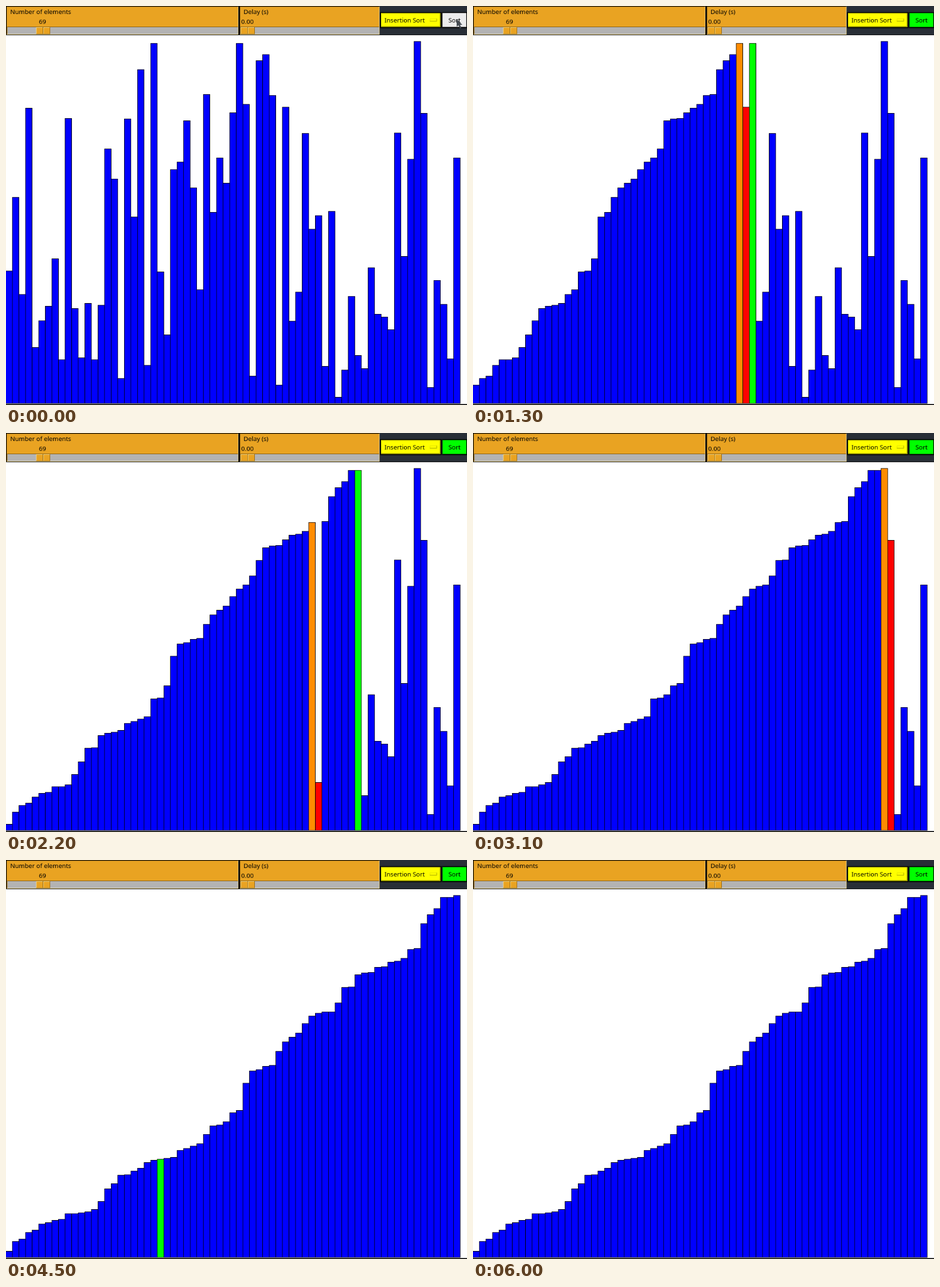
Animation of 804 by 697 pixels, one loop 6500 ms. Source, as an HTML page with a canvas:

```html
<!DOCTYPE html>
<html lang="en">
<head>
<meta charset="utf-8">
<title>Insertion sort</title>
<style>
html, body { margin: 0; width: 100%; height: 100%; overflow: hidden; background: #fff; }
canvas { display: block; }
</style>
</head>
<body>
<canvas id="stage" width="804" height="697"></canvas>
<script>
// The window is drawn at its natural size and then shrunk smoothly to the stage.
const W = 980, H = 850, SHRINK = 0.82;
const stage = document.getElementById('stage').getContext('2d');
const view = document.createElement('canvas');
view.width = W;
view.height = H;
const ctx = view.getContext('2d');

const LOOP = 6500, TICK = 100, BAR = 14, FLOOR = 846;
const BLUE = '#0000ff', GREEN = '#00ff00', RED = '#ff0000', ORANGE = '#ff8c00';
const PANEL = '#e9a322', SHADE = '#8c6214', GLOW = '#ffe490';

// The unsorted input, as the top edge of each bar on the stage.
const input = [
  462, 334, 503, 178, 596, 549, 524, 441, 617, 196, 528, 614, 519, 617, 522, 249, 302, 650,
  197, 368, 111, 627, 65, 464, 574, 285, 272, 200, 317, 495, 154, 360, 265, 309, 186, 65,
  171, 646, 95, 84, 156, 662, 176, 550, 499, 222, 389, 366, 629, 358, 683, 635, 507, 610,
  633, 457, 538, 543, 565, 221, 437, 267, 61, 187, 666, 479, 521, 616, 265
].map(y => Math.floor((y + 0.5) / SHRINK));

// Every swap of the sort, recorded just before it happens.
const steps = [];
const sorted = input.slice();
for (let i = 1; i < sorted.length; i++) {
  for (let j = i; j > 0 && sorted[j] > sorted[j - 1]; j--) {
    steps.push({ i, j, bars: sorted.slice() });
    [sorted[j - 1], sorted[j]] = [sorted[j], sorted[j - 1]];
  }
}

// Key points of the progress: swaps first, then the checking sweep.
const end = steps.length;
const stepAt = (i, j) => steps.findIndex(s => s.i === i && s.j === j);
const pace = [
  [300, 1], [700, stepAt(21, 17)], [1300, stepAt(42, 41)], [2200, stepAt(53, 47)],
  [3100, stepAt(63, 63)], [3700, end], [4300, end + 20], [4500, end + 23],
  [5000, end + 40], [6000, end + input.length]
];
const pauses = [400, 2600, 2700, 3400, 3900, 4400, 5100, 5600];

function progress(time) {
  const k = pace.findIndex(p => p[0] > time);
  if (k < 1) return k < 0 ? end + input.length : -1;
  const [t0, n0] = pace[k - 1], [t1, n1] = pace[k];
  return Math.round(n0 + (n1 - n0) * (time - t0) / (t1 - t0));
}

function rect(x, y, w, h, color) {
  ctx.fillStyle = color;
  ctx.fillRect(x, y, w, h);
}

function bevel(x, y, w, h, fill, topLeft, bottomRight, size = 1) {
  rect(x, y, w, h, bottomRight);
  rect(x, y, w - size, h - size, topLeft);
  rect(x + size, y + size, w - 2 * size, h - 2 * size, fill);
}

function label(text, x, y) {
  ctx.fillStyle = '#000';
  ctx.fillText(text, x, y);
}

function scale(x, w, title, value, valueX, knobX) {
  bevel(x, 1, w, 60, PANEL, SHADE, GLOW);
  bevel(x + 1, 44, w - 1, 17, '#b3b3b3', SHADE, GLOW);
  for (const half of [0, 15]) bevel(knobX + half, 45, 15, 15, PANEL, GLOW, SHADE);
  label(title, x + 8, 17);
  label(value, valueX, 38);
}

function cursor() {
  ctx.beginPath();
  [[958, 28], [958, 44], [962, 41], [965, 48], [968, 46], [965, 40], [970, 40]]
    .forEach(([x, y]) => ctx.lineTo(x, y));
  ctx.fillStyle = '#454b52';
  ctx.fill();
}

function header(time) {
  rect(0, 0, W, 62, '#000');
  rect(794, 0, W - 794, 61, '#282e36');
  ctx.font = '13.33px "Noto Sans", "Open Sans", sans-serif';
  scale(1, 493, 'Number of elements', '69', 70, 64);
  scale(497, 297, 'Delay (s)', '0.00', 500, 499);

  rect(795, 13, 131, 34, '#000');
  bevel(797, 15, 127, 30, '#ffff00', '#e6e600', '#999900', 2);
  bevel(901, 27, 15, 6, '#ffff00', '#e6e600', '#999900');
  label('Insertion Sort', 804.5, 35);

  const hover = time < 900, pressed = time >= 100 && time < 300;
  const edges = hover ? ['#ffffff', '#8e8e8e'] : ['#00e600', '#009900'];
  if (pressed) edges.reverse();
  rect(927, 13, 53, 34, '#000');
  bevel(928, 15, 51, 30, hover ? '#ececec' : GREEN, ...edges);
  label('Sort', 940.5 + pressed, 35 + pressed);
  if (hover) cursor();
}

function chart(time) {
  rect(0, 62, W, 786, '#fff');
  rect(0, 848, W, 2, '#000');
  const n = progress(time), step = steps[n];
  const bars = n < 0 ? input : step ? step.bars : sorted;
  const marks = step
    ? { [step.i]: GREEN, [step.j - 1]: ORANGE, [step.j]: RED }
    : { [n - end]: GREEN };
  if (step) marks[step.j] = RED;
  bars.forEach((top, i) => {
    const x = i * BAR - 1;
    rect(x, top, BAR + 1, FLOOR - top + 1, '#000');
    rect(x + 1, top + 1, BAR - 1, FLOOR - top - 1, marks[i] || BLUE);
  });
}

function draw(now) {
  let time = Math.floor(now % LOOP / TICK) * TICK;
  while (pauses.includes(time)) time -= TICK;
  header(time);
  chart(time);
  stage.drawImage(view, 0, 0, 804, 697);
  requestAnimationFrame(draw);
}
draw(performance.now());
</script>
</body>
</html>
```
